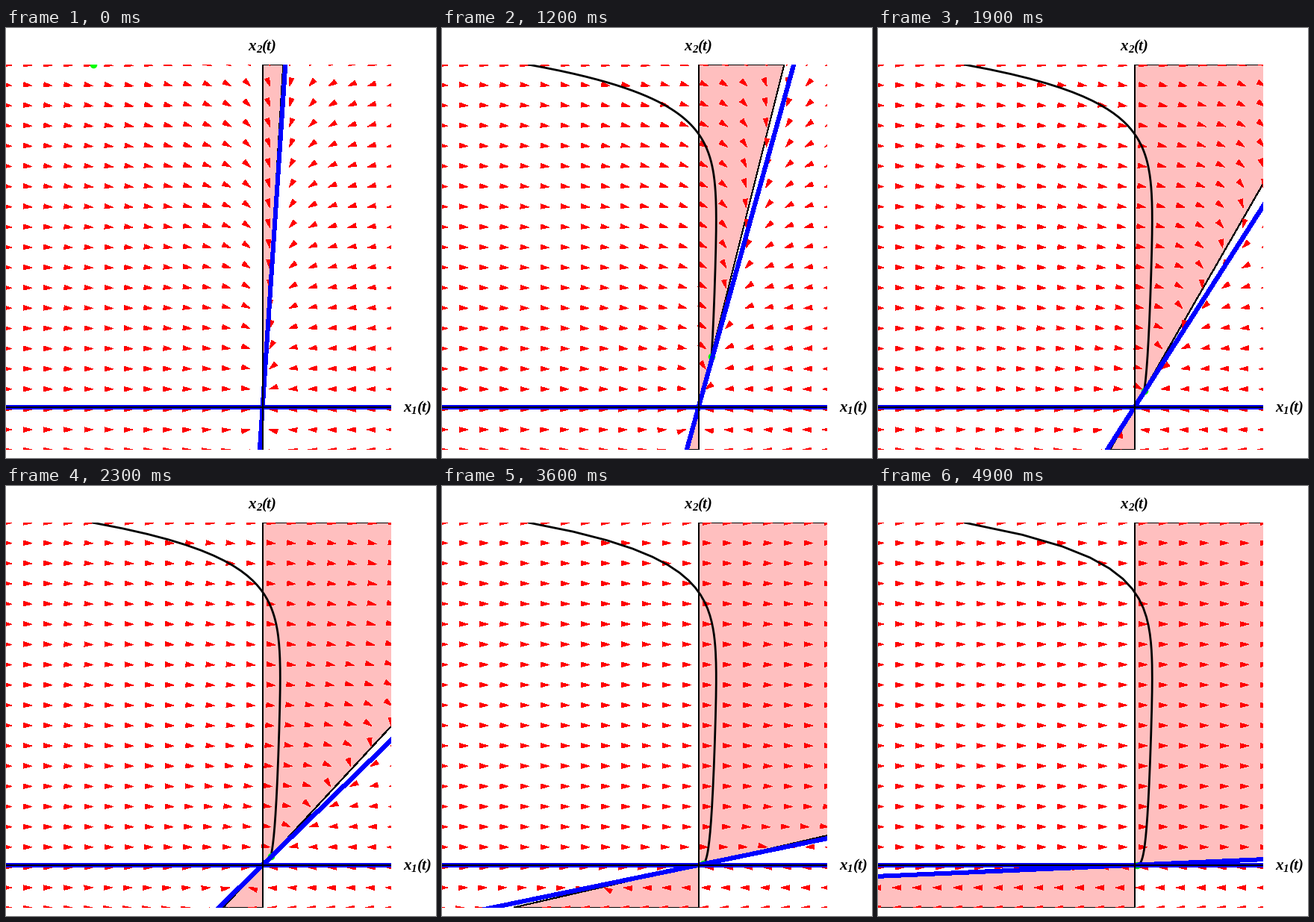
These frames come from a looping animation (576x576 px, 5000 ms). A matplotlib script:

```python
import numpy as np
import matplotlib.pyplot as plt
from matplotlib.animation import FuncAnimation
from matplotlib.collections import PolyCollection

SIZE, DPI = 576, 72
FRAMES, INTERVAL = 50, 100
LEFT, RIGHT, TOP, BOTTOM = 0, 516, 49, 565
OX, OY = 343.7, 507.7                 # origin of the phase plane, in pixels
START = np.array([-227.0, 458.5])     # initial state, y pointing up

# x1' = A (-x1 + g(n) x2),  x2' = -C x2,  g(n) = G0 exp(B n), n in frames
A, B, C, G0 = 1.6, 0.119, 0.16, 0.06

HEAD = np.array([[0, 0], [-11, 3.1], [-11, -3.1]])
GRID_X, GRID_Y = np.meshgrid(np.linspace(LEFT, RIGHT, 20),
                             np.linspace(TOP, BOTTOM, 20) + 0.2)


def gain(n):
    return G0 * np.exp(B * n)


def trajectory(n):
    """Exact solution of the linear time-varying system, in pixels."""
    forced = A * G0 * START[1] / (A + B - C)
    x1 = (START[0] - forced) * np.exp(-A * n) + forced * np.exp((B - C) * n)
    x2 = START[1] * np.exp(-C * n)
    return OX + x1, OY - x2


def arrow_heads(n):
    x1, x2 = GRID_X - OX, OY - GRID_Y
    u, v = gain(n) * x2 - x1, C / A * x2     # v is positive downwards
    norm = np.hypot(u, v) + 1e-9
    cos, sin = (u / norm).ravel(), (v / norm).ravel()
    along = HEAD[:, 0] + 7.5 * np.minimum(1, norm / 210).reshape(-1, 1)
    across = HEAD[:, 1]
    xs = GRID_X.reshape(-1, 1) + along * cos[:, None] - across * sin[:, None]
    ys = GRID_Y.reshape(-1, 1) + along * sin[:, None] + across * cos[:, None]
    return np.stack([xs, ys], axis=-1)


def wedges(n):
    """Region between the x2 axis and the nullcline, above and below."""
    return [[(OX, OY), (OX, y), (OX + gain(n) * (OY - y), y)]
            for y in (TOP + 0.5, BOTTOM - 0.5)]


fig = plt.figure(figsize=(SIZE / DPI, SIZE / DPI), dpi=DPI, facecolor="white")
ax = fig.add_axes([LEFT / SIZE, 1 - BOTTOM / SIZE,
                   (RIGHT - LEFT) / SIZE, (BOTTOM - TOP) / SIZE])
ax.set_xlim(LEFT, RIGHT)
ax.set_ylim(BOTTOM, TOP)
ax.axis("off")


def label(x, baseline, index):
    style = dict(family="Liberation Serif", weight="bold", style="italic",
                 ha="left", va="baseline")
    for dx, dy, text, size in ((0, 0, "x", 21), (11, 3, index, 15),
                               (19, 0, "(t)", 21)):
        fig.text((x + dx) / SIZE, 1 - (baseline + dy) / SIZE, text,
                 fontsize=size, **style)


def crisp_line(xs, ys, color, width, zorder):
    line, = ax.plot(xs, ys, color=color, lw=width, antialiased=False,
                    snap=False, zorder=zorder)
    return line


label(324, 30, "2")
label(532, 514, "1")

region = PolyCollection([], facecolor="#ffbfbf", edgecolor="black",
                        linewidth=1, antialiased=False, snap=False, zorder=1)
arrows = PolyCollection([], facecolor="red", edgecolor="none",
                        antialiased=False, snap=False, zorder=2)
ax.add_collection(region, autolim=False)
ax.add_collection(arrows, autolim=False)
curve, = ax.plot([], [], color="black", lw=2.8, zorder=3)
dot, = ax.plot([], [], "o", color="#00ff00", ms=9.5, mew=0, zorder=4)

across, down = [LEFT - 9, RIGHT + 9], [TOP - 9, BOTTOM + 9]
crisp_line(across, [OY, OY], "blue", 5, 5)
eigenline = crisp_line([], [], "blue", 5, 5)
crisp_line(across, [OY, OY], "black", 1, 6)
crisp_line([OX, OX], down, "black", 1, 6)


def update(n):
    region.set_verts(wedges(n))
    arrows.set_verts(arrow_heads(n))
    curve.set_data(*trajectory(np.linspace(0, n, 220)))
    x, y = trajectory(n)
    dot.set_data([x], [y])
    slope = gain(n) * A / (A - C)
    reach = 600 / np.hypot(slope, 1)
    eigenline.set_data([OX - slope * reach, OX + slope * reach],
                       [OY + reach, OY - reach])
    return region, arrows, curve, dot, eigenline


anim = FuncAnimation(fig, update, frames=FRAMES, interval=INTERVAL,
                     repeat=True, repeat_delay=0)
plt.show()
```
